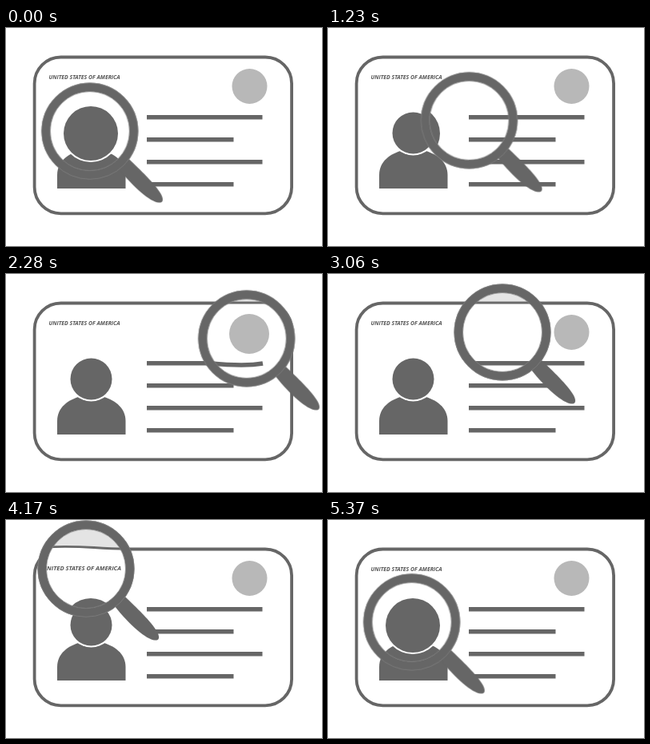
Animation of 395 by 273 pixels, one loop 5400 ms. Source, as an HTML page:

```html
<!DOCTYPE html>
<html lang="en">
<head>
<meta charset="utf-8">
<title>Identity card under a magnifier</title>
<style>
  html, body { margin: 0; width: 100%; height: 100%; overflow: hidden; background: #fff; }
  svg { display: block; width: 395px; height: 273px; }
  .ink { fill: #666; }
  .line { fill: none; stroke: #666; stroke-width: 5.5px; }
  .edge { fill: none; stroke: #858585; stroke-width: .7px; }
  .seal { fill: #b8b8b8; }
  text { font: italic 700 6.9px "Open Sans", "Noto Sans", sans-serif; fill: #555; }
  .large { font-size: 7.6px; text-anchor: end; }

  /* the bezier is a smoothstep; the delay puts the loop start just before the glass settles on the portrait */
  .follow { animation: inspect 5400ms cubic-bezier(.3333, 0, .6667, 1) -5240ms infinite; }

  /* portrait, seal, title: a slow drift at each, then a glide to the next */
  @keyframes inspect {
    0%, 100% { transform: translate(105px, 132.5px); }
    10%      { transform: translate(105px, 135.5px); }
    33.9%    { transform: translate(299px, 82px); }
    43.7%    { transform: translate(302px, 80px); }
    66.3%    { transform: translate(100px, 63px); }
    77.6%    { transform: translate(100px, 60.5px); }
  }
</style>
</head>
<body>
<svg viewBox="0 0 395 273">
  <defs>
    <clipPath id="glass"><circle class="follow" r="50"/></clipPath>
    <path id="body" d="M64 201V184C64 167 78 157 94 153H119C135 157 149.500 167 149.500 184V201Z"/>
    <path id="rows" d="M176 139.700H284.500M176 167.700H320.500M176 195.700H284.500"/>
  </defs>

  <!-- card -->
  <rect x="35.600" y="36.500" width="321.500" height="195.800" rx="33" fill="#fff" stroke="#666" stroke-width="3.800"/>
  <text x="53.500" y="63.600">UNITED STATES OF AMERICA</text>
  <circle class="seal" cx="304.500" cy="73" r="22"/>
  <use href="#body" class="ink"/>
  <circle cx="106.500" cy="131" r="28.500" fill="#fff"/>
  <circle class="ink" cx="106.500" cy="131.500" r="26"/>
  <path class="line" d="M176 111.700H320.500"/>
  <use href="#rows" class="line"/>

  <!-- enlarged view, visible only through the glass -->
  <g clip-path="url(#glass)">
    <rect width="395" height="273" fill="#e4e4e4"/>
    <path d="M30 240V35Q70 32 110 34.500T170 36H365V240Z" fill="#fff" stroke="#6a6a6a" stroke-width="2.800"/>
    <text class="large" x="144" y="62.800">UNITED STATES OF AMERICA</text>
    <circle class="seal" cx="304" cy="75" r="25"/>
    <use href="#body" class="ink"/>
    <circle cx="106" cy="132" r="36" fill="#fff"/>
    <circle class="ink" cx="106" cy="132" r="34"/>
    <path class="line" d="M176 111.700H255Q298 116 321 112"/>
    <use href="#rows" class="line"/>
  </g>

  <!-- magnifier -->
  <g class="follow">
    <path class="ink" d="M36 47L49 35C62 48 82 66 89 79C93 87 91 90 86 89.500C76 89 54 70 36 47Z"/>
    <circle r="55" fill="none" stroke="#666" stroke-width="11"/>
    <circle class="edge" r="60.300"/>
    <circle class="edge" r="49.500"/>
  </g>
</svg>
</body>
</html>
```
